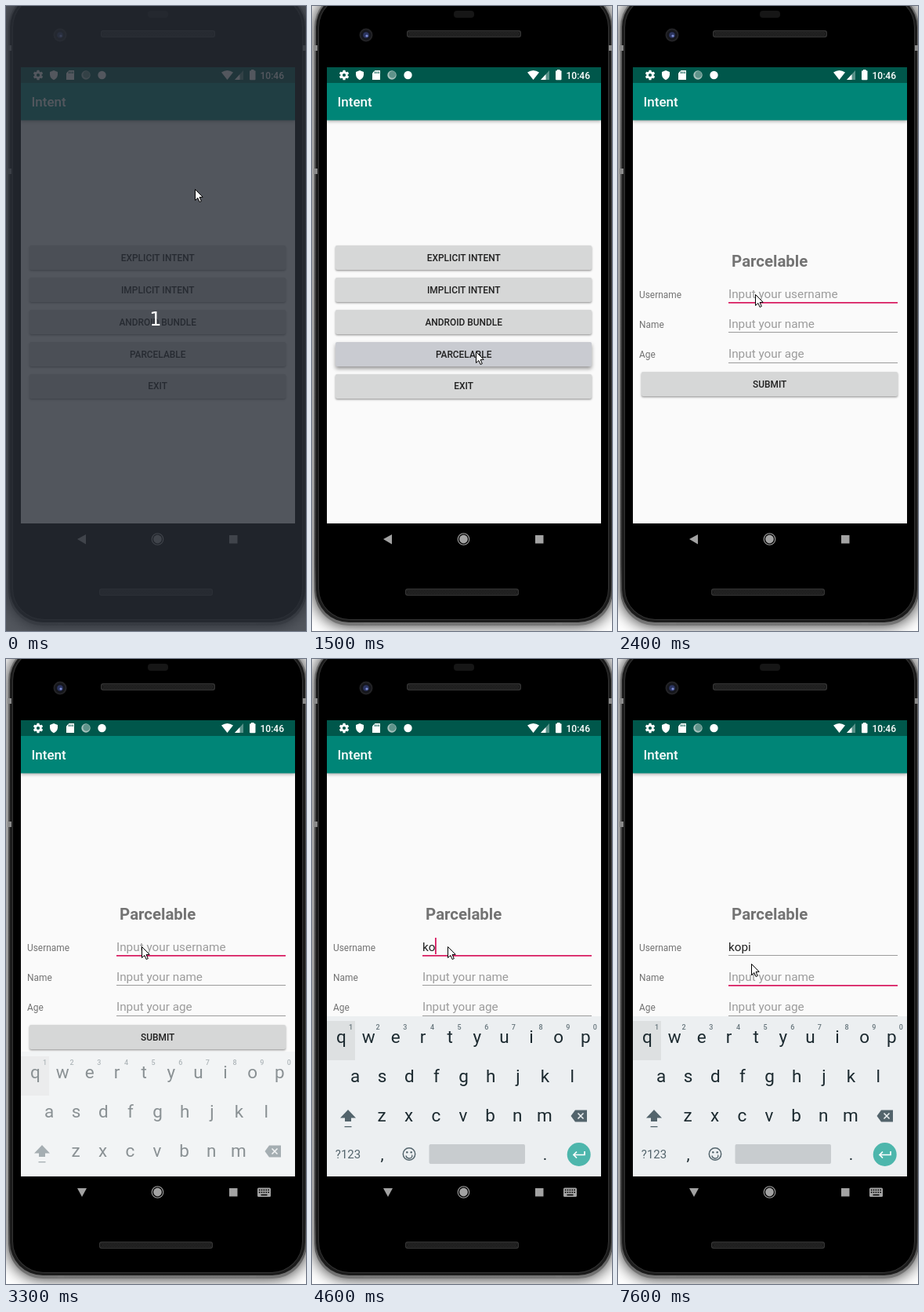
Recreate the animation shown at these times as an HTML page with a canvas. Size 383 px wide and 796 px high, loop 8000 ms.

```html
<!DOCTYPE html>
<html lang="en">
<head>
<meta charset="utf-8">
<title>Intent demo</title>
<style>
  html, body { margin: 0; width: 100%; height: 100%; overflow: hidden; background: #fff; }
  canvas { display: block; }
</style>
</head>
<body>
<canvas id="stage" width="383" height="796"></canvas>
<script>
const W = 383, H = 796, LOOP = 8000, STEP = 100;
const PINK = '#d81b60', GREEN = '#008577', DARK_GREEN = '#00574b', PAPER = '#fafafa';
const SCREEN = { x: 19, y: 78, w: 350, h: 581 };
const stage = document.getElementById('stage').getContext('2d');
const USERNAME = 'kopi';

function makeLayer(paint) {
  const canvas = document.createElement('canvas');
  canvas.width = W;
  canvas.height = H;
  const c = canvas.getContext('2d');
  if (paint) paint(c);
  return { canvas, c };
}

function rect(c, x, y, w, h, fill, radius = 0) {
  c.fillStyle = fill;
  c.beginPath();
  c.roundRect(x, y, w, h, radius);
  c.fill();
}

function disc(c, x, y, r, fill) {
  c.fillStyle = fill;
  c.beginPath();
  c.arc(x, y, r, 0, Math.PI * 2);
  c.fill();
}

function poly(c, points, fill) {
  c.beginPath();
  points.forEach(([x, y]) => c.lineTo(x, y));
  c.closePath();
  c.fillStyle = fill;
  c.fill();
}

function text(c, str, x, y, size, color, weight = 400, align = 'left', family = 'Roboto') {
  c.font = `${weight} ${size}px ${family}, sans-serif`;
  c.textAlign = align;
  c.textBaseline = 'alphabetic';
  c.fillStyle = color;
  c.fillText(str, x, y);
}

function withShadow(c, blur, dy, color, draw) {
  c.save();
  c.shadowBlur = blur;
  c.shadowOffsetY = dy;
  c.shadowColor = color;
  draw();
  c.restore();
}

// Phone body

function speaker(c, x, y, w) {
  rect(c, x, y, w, 9, '#363636', 3);
  rect(c, x + 1, y + 1, w - 2, 7, '#1c1c1c', 3);
  c.fillStyle = '#2e2e2e';
  for (let row = 0; row < 3; row++)
    for (let i = x + 3 + row % 2; i < x + w - 3; i += 2) c.fillRect(i, y + 2 + row * 2, 1, 1);
}

function paintPhone(c) {
  rect(c, 0, 0, W, H, '#fff');
  const edge = c.createLinearGradient(0, 0, 0, 790);
  edge.addColorStop(0, '#6e6e6e');
  edge.addColorStop(0.3, '#4a4a4a');
  edge.addColorStop(0.9, '#3a3a3a');
  edge.addColorStop(1, '#777');
  withShadow(c, 20, 0, 'rgba(0,0,0,.85)', () => rect(c, 3, -17, 381, 806, edge, 44));
  rect(c, 5, -15, 377, 800, '#1b1b1b', 42);
  rect(c, 8, -13, 371, 795, '#343434', 40);
  rect(c, 9, -12, 369, 793, '#000', 39);
  for (const y of [50, 207]) rect(c, 2, y, 5, 7, '#8a8a8a');
  rect(c, 379, 50, 4, 7, '#8a8a8a');
  for (const x of [66, 311]) rect(c, x, 785, 8, 4, '#777');

  rect(c, 181, 6, 26, 9, '#161616', 4);
  disc(c, 69, 37, 8.5, '#232326');
  disc(c, 69, 37, 6.5, '#15161c');
  disc(c, 69, 37, 3.8, '#2c3560');
  disc(c, 70, 38, 1.6, '#7f8fd6');
  speaker(c, 121, 31, 146);
  speaker(c, 119, 742, 145);
}

// Status bar icons and navigation bar

function gear(c, x, y) {
  c.save();
  c.translate(x, y);
  for (let i = 0; i < 3; i++) {
    c.rotate(Math.PI / 3);
    rect(c, -1.6, -6.3, 3.2, 12.6, '#fff', 0.6);
  }
  disc(c, 0, 0, 4.7, '#fff');
  disc(c, 0, 0, 2.1, DARK_GREEN);
  c.restore();
}

function statusIcons(c) {
  gear(c, 41, 88);
  c.beginPath();
  c.moveTo(61, 82);
  c.lineTo(66, 84);
  c.lineTo(66, 87.5);
  c.quadraticCurveTo(65.6, 92, 61, 94.2);
  c.quadraticCurveTo(56.4, 92, 56, 87.5);
  c.lineTo(56, 84);
  c.fillStyle = '#fff';
  c.fill();
  poly(c, [[80.5, 82], [87, 82], [87, 94], [77, 94], [77, 85.5]], '#fff');
  for (const x of [80, 82.3, 84.6]) rect(c, x, 83.5, 1.1, 2.6, DARK_GREEN);
  disc(c, 102, 88, 5.7, '#a8c3be');
  disc(c, 102.6, 87.4, 4.3, '#5f938a');
  disc(c, 122.5, 88, 5.2, '#fff');

  c.beginPath();
  c.moveTo(282.5, 94);
  c.lineTo(275, 84.6);
  c.quadraticCurveTo(282.5, 79.4, 290, 84.6);
  c.fillStyle = '#fff';
  c.fill();
  poly(c, [[292, 94], [303, 82], [303, 94]], 'rgba(255,255,255,.35)');
  poly(c, [[292, 94], [298.5, 87], [298.5, 94]], '#fff');
  rect(c, 311, 82.3, 7.5, 11.9, '#fff', 1);
  rect(c, 313, 81, 3.5, 2, '#fff');
  text(c, '10:46', 355, 92.6, 12, '#fff', 500, 'right');
}

function navBar(c, keyboardOpen) {
  const gray = '#a3a3a3';
  poly(c, keyboardOpen
    ? [[91, 674], [103, 674], [97, 685]]
    : [[91, 679], [102, 673], [102, 685.5]], gray);
  c.strokeStyle = gray;
  c.lineWidth = 1.1;
  c.beginPath();
  c.arc(193.5, 679, 7.3, 0, Math.PI * 2);
  c.stroke();
  disc(c, 193.5, 679, 5.4, gray);
  rect(c, 285, 674, 10.5, 10.5, gray);
  if (!keyboardOpen) return;
  rect(c, 321, 673.5, 17, 11.5, gray, 1.5);
  for (let i = 0; i < 5; i++)
    for (const y of [675.5, 678.5]) rect(c, 322.8 + i * 2.9, y, 1.6, 1.6, '#000');
  rect(c, 325.5, 681.8, 8, 1.5, '#000');
}

// App screens

function appFrame(c) {
  rect(c, SCREEN.x, SCREEN.y, SCREEN.w, SCREEN.h, PAPER);
  c.save();
  c.beginPath();
  c.rect(SCREEN.x, SCREEN.y, SCREEN.w, SCREEN.h);
  c.clip();
  withShadow(c, 4, 1.2, 'rgba(0,0,0,.32)', () => rect(c, 19, 98, 350, 47.5, GREEN));
  c.restore();
  rect(c, 19, 78, 350, 20, DARK_GREEN);
  text(c, 'Intent', 32.5, 128, 17, '#fff', 500);
}

function button(c, label, y, pressed) {
  withShadow(c, pressed ? 5 : 2.5, pressed ? 3 : 1.2, 'rgba(0,0,0,.4)', () =>
    rect(c, 30, Math.round(y), 327, 31, pressed ? '#c9cbd1' : '#d6d7d7', 2));
  text(c, label, 193.7, Math.round(y + 19.7), 11.9, '#202020', 500, 'center');
}

function paintMenu(c, pressed) {
  appFrame(c);
  ['EXPLICIT INTENT', 'IMPLICIT INTENT', 'ANDROID BUNDLE', 'PARCELABLE', 'EXIT'].forEach(
    (label, i) => button(c, label, 305.4 + i * 40.85, pressed && i === 3));
}

function field(c, row, label, value, hint, focused, caret) {
  const y = 371.5 + row * 38.3;
  text(c, label, 27, y, 11.9, '#737373');
  text(c, value || hint, 141, y, 15.3, value ? '#212121' : '#9c9c9c');
  const line = Math.round(377 + row * 38.4);
  rect(c, 141, line, 216, focused ? 1.7 : 1, focused ? PINK : '#9b9b9b');
  if (caret) {
    const end = value ? c.measureText(value).width - 0.3 : 0;
    rect(c, 141 + Math.round(end), Math.round(y - 16.4), 1.8, 21, PINK);
  }
}

function paintForm(c, t) {
  const onName = t >= 6900;
  const caret = formCaret(t);
  appFrame(c);
  text(c, 'Parcelable', 193.7, 332, 20.4, '#737373', 700, 'center');
  field(c, 0, 'Username', USERNAME.slice(0, typedCount(t)), 'Input your username', !onName, !onName && caret);
  field(c, 1, 'Name', '', 'Input your name', onName, onName && caret);
  field(c, 2, 'Age', '', 'Input your age', false, false);
  button(c, 'SUBMIT', 466.3, false);
}

const typedCount = t => t >= 5000 ? 4 : t >= 4600 ? 2 : t >= 4400 ? 1 : 0;

function formCaret(t) {
  const visible = [[1700, 2100], [3000, 3100], [3800, 5500], [6000, 6500], [7000, 7500]];
  return visible.some(([from, to]) => t >= from && t < to);
}

// Keyboard

const KEY = 34.65;

function keyRow(c, letters, x, y) {
  [...letters].forEach((ch, i) => text(c, ch, x + i * KEY, y, 22.5, '#1c2a30', 400, 'center'));
}

function paintKeyboard(c) {
  const slate = '#53646c';
  rect(c, 19, 455, 350, 204, '#eceff1');
  rect(c, 19, 461, 36, 50, '#dde0e1');
  keyRow(c, 'qwertyuiop', 37.5, 488.8);
  [...'1234567890'].forEach((n, i) => text(c, n, 49.5 + i * KEY, 472, 9, '#66757c', 500, 'center'));
  keyRow(c, 'asdfghjkl', 55, 538.6);
  keyRow(c, 'zxcvbnm', 89, 589);

  poly(c, [[46, 574], [56, 584.5], [50, 584.5], [50, 589], [42, 589], [42, 584.5], [36, 584.5]], slate);
  rect(c, 41.5, 595, 9, 1.3, slate);

  poly(c, [[330.5, 582], [336, 574.5], [351, 574.5], [351, 589.5], [336, 589.5]], slate);
  c.strokeStyle = '#eceff1';
  c.lineWidth = 1.6;
  c.beginPath();
  for (const s of [-1, 1]) {
    c.moveTo(339.5, 582 - 3.5 * s);
    c.lineTo(346.5, 582 + 3.5 * s);
  }
  c.stroke();

  text(c, '?123', 46, 636.3, 15, slate, 400, 'center');
  text(c, ',', 89.5, 637.5, 21, '#1c2a30', 400, 'center');
  text(c, '.', 297.5, 637.5, 21, '#1c2a30', 400, 'center');

  c.strokeStyle = slate;
  c.lineWidth = 1.5;
  c.beginPath();
  c.arc(124, 630.5, 7.7, 0, Math.PI * 2);
  c.moveTo(128, 632.5);
  c.arc(124, 632, 4, 0.12, Math.PI - 0.12);
  c.stroke();
  for (const x of [121.3, 126.7]) disc(c, x, 628.3, 1.2, slate);

  rect(c, 149.5, 618, 122.5, 25, '#c8cccf', 2);
  disc(c, 340.7, 631, 15, '#4db6ac');
  c.strokeStyle = '#fff';
  c.lineWidth = 1.7;
  c.beginPath();
  c.moveTo(348, 627);
  c.lineTo(348, 631.5);
  c.lineTo(334, 631.5);
  c.moveTo(338, 627.5);
  c.lineTo(334, 631.5);
  c.lineTo(338, 635.5);
  c.stroke();
}

// Motion

const pointerPath = [
  [400, 241, 233], [1200, 209, 440], [1900, 209, 440], [2300, 176, 372], [2400, 175, 367],
  [2600, 175, 367], [2700, 173, 366], [6000, 173, 366], [6500, 173, 413], [6800, 170, 402],
  [7200, 170, 402], [7600, 170, 388],
];

function along(path, t) {
  if (t <= path[0][0]) return path[0].slice(1);
  for (let i = 1; i < path.length; i++) {
    const [t0, ...a] = path[i - 1], [t1, ...b] = path[i];
    if (t <= t1) {
      const k = (t - t0) / (t1 - t0), ease = k * k * (3 - 2 * k);
      return a.map((v, j) => v + (b[j] - v) * ease);
    }
  }
  return path[path.length - 1].slice(1);
}

function pointer(c, [x, y]) {
  c.save();
  c.translate(Math.round(x) + 0.5, Math.round(y) + 0.5);
  poly(c, [[0, 0], [0, 14], [3.4, 11], [5.6, 16], [7.8, 15], [5.6, 10], [9.7, 9.8]], '#fff');
  c.strokeStyle = '#000';
  c.lineWidth = 1;
  c.stroke();
  c.restore();
}

const phone = makeLayer(paintPhone);
const keyboard = makeLayer(paintKeyboard);
const form = makeLayer();

function drawForm(t) {
  form.c.clearRect(0, 0, W, H);
  paintForm(form.c, t);
  // The new screen fades in while it settles upward.
  const [shift, alpha] = along([[1700, 13, 0.87], [1800, 5, 1], [1900, 1, 1], [2000, 0, 1]], t);
  stage.globalAlpha = alpha;
  stage.drawImage(form.canvas, 0, Math.round(shift));
  stage.globalAlpha = 1;
}

function drawKeyboard(t) {
  const [shift, alpha] = along([[3300, 45, 0.5], [3400, 8, 0.9], [3500, 0, 1]], t);
  stage.save();
  stage.beginPath();
  stage.rect(SCREEN.x, SCREEN.y, SCREEN.w, SCREEN.h);
  stage.clip();
  stage.globalAlpha = alpha;
  stage.drawImage(keyboard.canvas, 0, shift);
  stage.restore();
}

function render(t) {
  stage.drawImage(phone.canvas, 0, 0);
  if (t < 2000) paintMenu(stage, t >= 1500);
  if (t >= 1700) drawForm(t);
  if (t >= 3300) drawKeyboard(t);
  statusIcons(stage);
  navBar(stage, t >= 3300);
  if (t < 400) {
    rect(stage, 0, 0, W, H, 'rgba(41,45,54,.8)');
    text(stage, '1', 191, 406.5, 24, '#fff', 400, 'center', '"DejaVu Sans"');
  }
  pointer(stage, along(pointerPath, t));
}

function tick(now) {
  render(Math.floor(now % LOOP / STEP) * STEP);
  requestAnimationFrame(tick);
}
requestAnimationFrame(tick);
</script>
</body>
</html>
```
